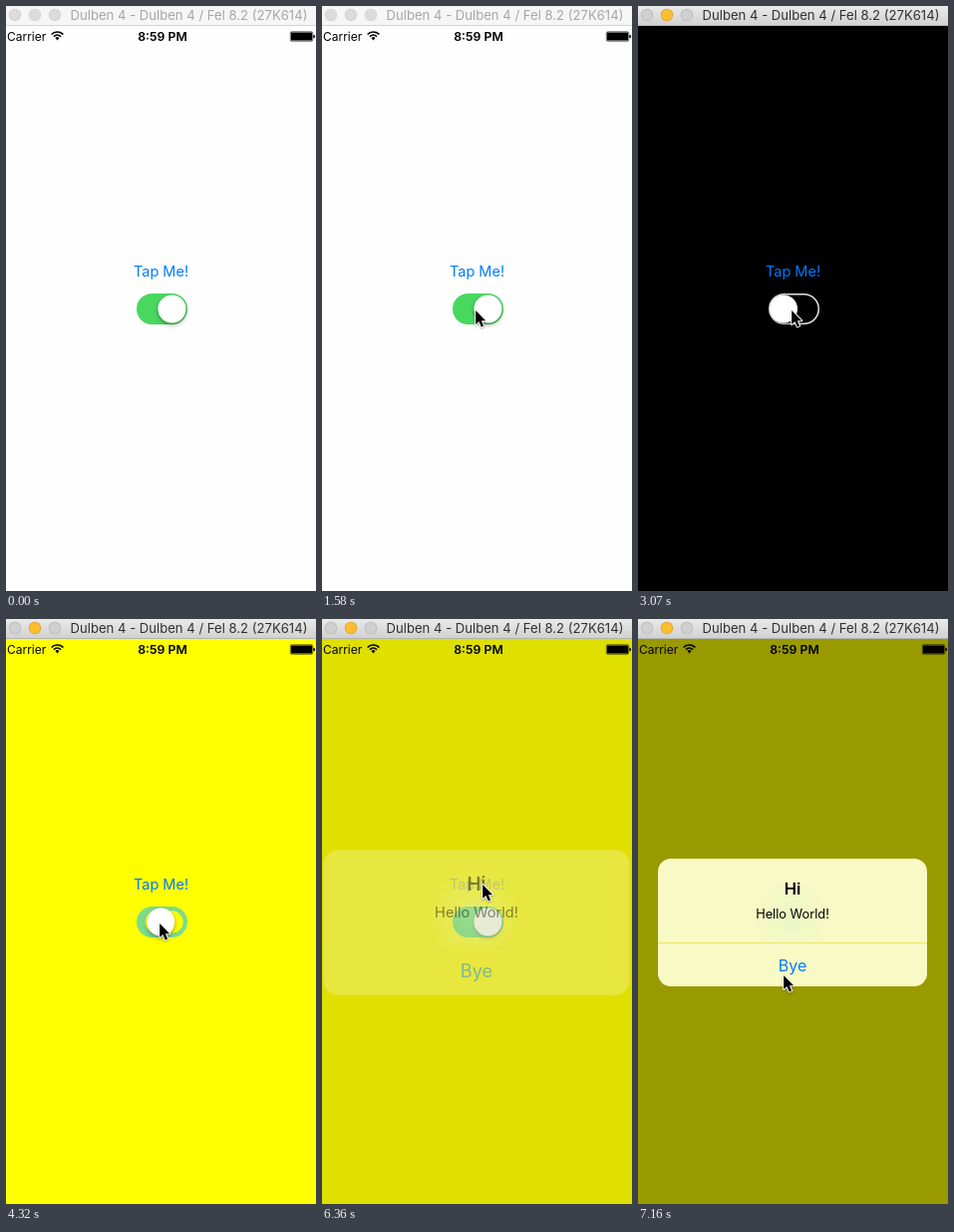
Write an HTML page with a canvas that moves like this. It is 311 px wide and 586 px high and loops after 8 s.

```html
<!DOCTYPE html>
<html lang="en">
<head>
<meta charset="utf-8">
<title>Switch and alert</title>
<style>
html, body { margin: 0; width: 100%; height: 100%; overflow: hidden; background: #fefefe; }
canvas { display: block; width: 311px; height: 586px; }
</style>
</head>
<body>
<canvas id="stage"></canvas>
<script>
const W = 311, H = 586, LOOP = 8000, BAR = 20;
const BLUE = '#007aff', OFF = [229, 229, 229], GREEN = [72, 216, 96];
const canvas = document.getElementById('stage');
const ctx = canvas.getContext('2d');
const ratio = window.devicePixelRatio || 1;
canvas.width = W * ratio;
canvas.height = H * ratio;

const mix = (a, b, p) => a + (b - a) * p;
const easeOut = (p, power) => 1 - (1 - p) ** power;
const smooth = p => p * p * (3 - 2 * p);

// Number of discrete screen updates done: 0 before start, count from end on.
function stepsDone(t, start, end, count) {
  if (t < start) return 0;
  const gap = (end - start) / (count - 1);
  return Math.min(count, Math.floor((t - start) / gap + 0.15) + 1);
}

function text(str, x, y, size, color, weight = 400, align = 'center') {
  ctx.font = `${weight} ${size}px Inter, "Open Sans", sans-serif`;
  ctx.textAlign = align;
  ctx.fillStyle = color;
  ctx.fillText(str, x, y);
}

function disc(x, y, r, color) {
  ctx.beginPath();
  ctx.arc(x, y, r, 0, Math.PI * 2);
  ctx.fillStyle = color;
  ctx.fill();
}

function roundBox(x, y, w, h, r) {
  ctx.beginPath();
  ctx.roundRect(x, y, w, h, r);
}

function drawTitleBar(active) {
  const shade = ctx.createLinearGradient(0, 0, 0, BAR);
  shade.addColorStop(0, active ? '#eaeaea' : '#f6f6f6');
  shade.addColorStop(1, active ? '#d0d0d0' : '#f6f6f6');
  ctx.fillStyle = shade;
  ctx.fillRect(0, 0, W, BAR);
  ctx.fillStyle = active ? '#b4b4b4' : '#d4d4d4';
  ctx.fillRect(0, BAR - 1, W, 1);
  for (const x of [9, 29, 49]) {
    const lit = active && x === 29;
    disc(x, 9, 6.2, lit ? '#dea133' : active ? '#b9b9b9' : '#d2d2d2');
    disc(x, 9, 5.4, lit ? '#fdbe2f' : active ? '#d0d0d0' : '#dcdcdc');
  }
  text('Dulben 4 - Dulben 4 / Fel 8.2 (27K614)', 183.5, 14, 13.1, active ? '#303030' : '#a6a6a6');
}

function drawStatusBar() {
  text('Carrier', 1, 35, 12, '#000', 400, 'left');
  text('8:59 PM', 157, 35, 12.3, '#000', 600);
  ctx.strokeStyle = '#000';
  ctx.lineWidth = 1.7;
  for (const r of [4.8, 8]) {
    ctx.beginPath();
    ctx.arc(51.5, 34, r, -Math.PI * 0.76, -Math.PI * 0.24);
    ctx.stroke();
  }
  ctx.beginPath();
  ctx.moveTo(51.5, 34.4);
  ctx.arc(51.5, 34, 2.8, -Math.PI * 0.76, -Math.PI * 0.24);
  ctx.fillStyle = '#000';
  ctx.fill();
  ctx.lineWidth = 0.6;
  roundBox(285.3, 25.8, 22.4, 9.4, 1.4);
  ctx.stroke();
  ctx.fillRect(286, 26.5, 21, 8);
  roundBox(308.3, 28.8, 1.7, 3.4, [0, 1.5, 1.5, 0]);
  ctx.fill();
}

// on: 0 is off, 1 is on. The hole in the track shrinks into the right end.
function drawSwitch(on, background) {
  const tint = OFF.map((c, i) => Math.round(mix(c, GREEN[i], Math.sqrt(on))));
  roundBox(131, 288, 51, 31, 15.5);
  ctx.fillStyle = `rgb(${tint})`;
  ctx.fill();
  const scale = 1 - on * on;
  if (scale > 0.01) {
    roundBox(166.5 - 34 * scale, 303.5 - 14 * scale, 48 * scale, 28 * scale, 14 * scale);
    ctx.fillStyle = background;
    ctx.fill();
  }
  ctx.save();
  ctx.shadowColor = 'rgba(0,0,0,0.35)';
  ctx.shadowBlur = 4 * ratio;
  ctx.shadowOffsetY = 2 * ratio;
  disc(mix(146, 166.5, on), 303.5, 14, '#fff');
  ctx.restore();
}

function drawAlert(shown) {
  ctx.fillStyle = `rgba(0,0,0,${0.4 * shown})`;
  ctx.fillRect(0, BAR, W, H - BAR);
  ctx.save();
  const scale = mix(1.2, 1, shown);
  ctx.translate(155, 304);
  ctx.scale(scale, scale);
  ctx.translate(-155, -304);
  ctx.globalAlpha = shown;
  roundBox(20, 240, 270, 128, 13);
  ctx.fillStyle = '#f9f9c5';
  ctx.fill();
  const glow = ctx.createRadialGradient(153, 299, 5, 153, 299, 42);
  glow.addColorStop(0, 'rgba(232,248,196,0.9)');
  glow.addColorStop(1, 'rgba(240,248,196,0)');
  ctx.fillStyle = glow;
  ctx.fillRect(105, 255, 96, 69);
  ctx.fillStyle = '#e6e668';
  ctx.fillRect(20, 324, 270, 1);
  ctx.globalAlpha = shown ** 0.7;
  text('Hi', 155, 276, 16.5, '#000', 600);
  text('Hello World!', 155, 300, 12.8, '#000');
  text('Bye', 155, 352.5, 16, BLUE);
  ctx.restore();
}

function cursorAt(t) {
  const enter = stepsDone(t, 180, 970, 10);
  if (!enter) return null;
  const glide = (from, to, p) => from.map((v, i) => Math.round(mix(v, to[i], p)));
  const low = [162.5, 364], onSwitch = [153, 304], peak = [162, 247], onButton = [160, 265];
  const leave = stepsDone(t, 6980, 7160, 3);
  if (leave) return glide(onButton, [144.5, 356], smooth(leave / 3));
  const rise = stepsDone(t, 5310, 5920, 8);
  if (rise > 5) return glide(peak, onButton, smooth((rise - 5) / 3));
  if (rise) return glide(onSwitch, peak, smooth(rise / 5));
  const approach = stepsDone(t, 1060, 1580, 7);
  if (approach) return glide(low, onSwitch, smooth(approach / 7));
  return glide([206, 610], low, easeOut(enter / 10, 1.7));
}

function drawCursor([x, y]) {
  const outline = [[0, 0], [0, 14], [3.2, 11], [5.6, 16.4], [8, 15.4], [5.7, 10.2], [10, 10.2]];
  ctx.save();
  ctx.translate(x + 1.2, y + 1);
  ctx.beginPath();
  outline.forEach(p => ctx.lineTo(...p));
  ctx.closePath();
  ctx.shadowColor = 'rgba(0,0,0,0.3)';
  ctx.shadowBlur = 2 * ratio;
  ctx.shadowOffsetY = ratio;
  ctx.strokeStyle = '#fff';
  ctx.lineWidth = 2;
  ctx.lineJoin = 'round';
  ctx.stroke();
  ctx.shadowColor = 'transparent';
  ctx.fillStyle = '#000';
  ctx.fill();
  ctx.restore();
}

function draw(t) {
  const turnOff = stepsDone(t, 2710, 3070, 5);
  const turnOn = stepsDone(t, 4320, 4680, 5);
  const alertStep = stepsDone(t, 6280, 6720, 6);
  const background = turnOn ? '#ffff00' : turnOff ? '#000' : '#fefefe';
  const on = turnOn ? easeOut(turnOn / 5, 2.7) : 1 - easeOut(turnOff / 5, 2.7);

  ctx.setTransform(ratio, 0, 0, ratio, 0, 0);
  ctx.fillStyle = background;
  ctx.fillRect(0, 0, W, H);
  text('Tap Me!', 155.5, 270.5, 14.5, alertStep ? 'rgba(120,130,140,0.5)' : BLUE);
  drawSwitch(on, background);
  if (alertStep) {
    // Critically damped spring, normalised to settle on the last update.
    const spring = k => 1 - (1 + 1.12 * k) * Math.exp(-1.12 * k);
    drawAlert(spring(alertStep - 1) / spring(5));
  }
  drawStatusBar();
  drawTitleBar(turnOff > 0);
  const cursor = cursorAt(t);
  if (cursor) drawCursor(cursor);
}

const begin = performance.now();
function tick() {
  draw((performance.now() - begin) % LOOP);
  requestAnimationFrame(tick);
}
tick();
</script>
</body>
</html>
```
